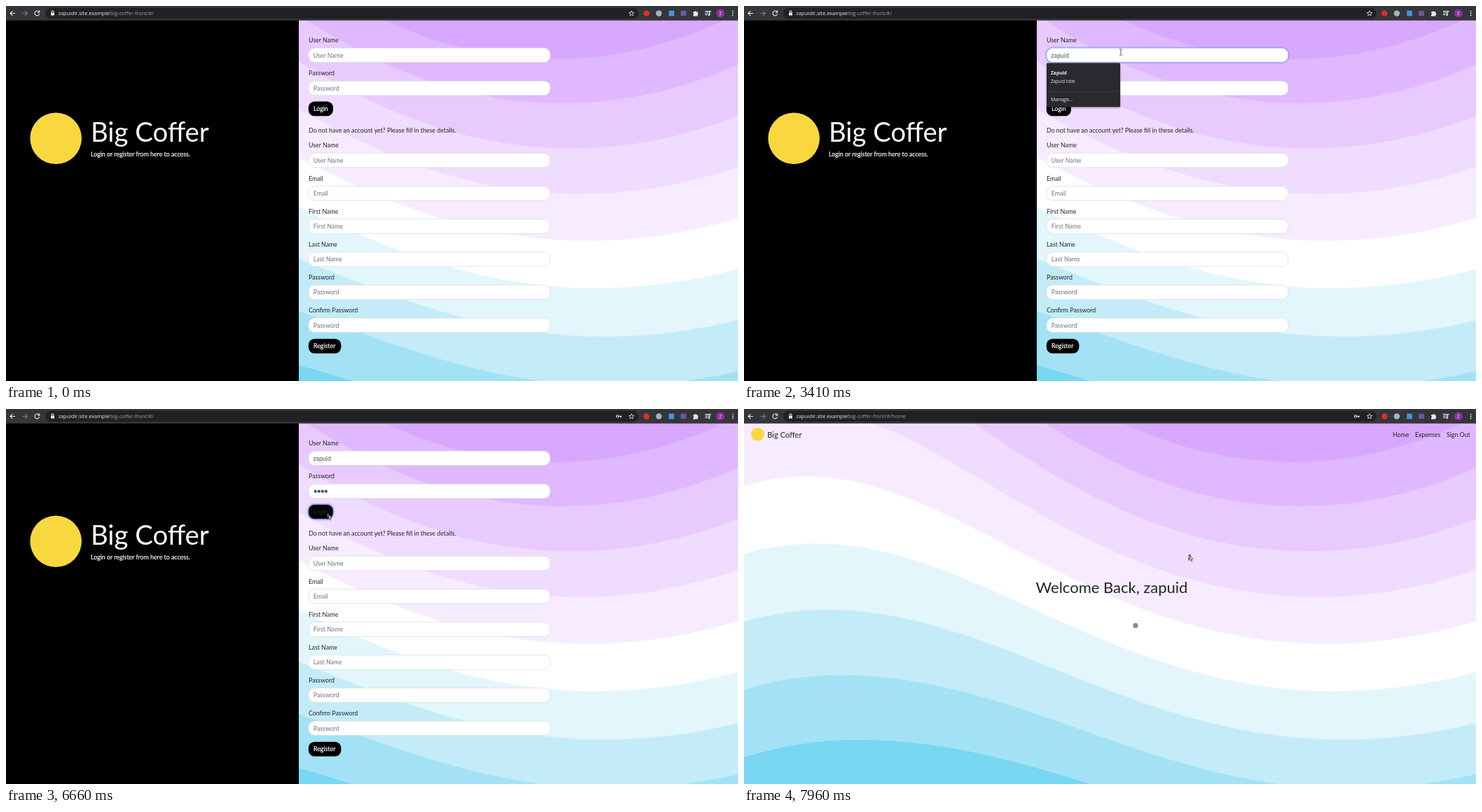
Animation, 1045 px wide and 536 px high, one loop 8000 ms. Source, as an HTML page:

```html
<!DOCTYPE html>
<html lang="en">
<head>
<meta charset="utf-8">
<title>Sign in</title>
<style>
  html, body { margin: 0; width: 100%; height: 100%; overflow: hidden; background: #000; }
  svg { display: block; width: 1045px; height: 536px; }
  text { font: 8.8px Lato, sans-serif; fill: #212529; white-space: pre; }
  .chrome text, .menu text { font-family: "Open Sans", sans-serif; fill: #e8eaed; }
  .icon { fill: none; stroke: #e8eaed; stroke-width: 1.1; }
  .field { fill: #fff; stroke: #ced4da; stroke-width: .6; }
  .hint { fill: #6c757d; }
  .value { fill: #495057; }
  .light { fill: #fff; stroke: #fff; stroke-width: .2px; }
  .ring { fill: none; stroke: #7c9cff; stroke-opacity: .55; stroke-width: 2.4; }
  .caret { stroke: #333; stroke-width: .7; }
</style>
</head>
<body>
<svg viewBox="0 0 1045 536">
  <g id="waves"><rect width="1045" height="536" fill="#d8a8ff"/></g>

  <g id="login">
    <rect y="20" width="418" height="516"/>
    <circle cx="71.2" cy="189.2" r="36.8" fill="#f9d83f"/>
    <text x="121" y="194" style="font-size:38.3px;fill:#fff">Big Coffer</text>
    <text class="light" x="121" y="215">Login or register from here to access.</text>
    <g id="form"></g>
    <text x="432" y="180.5">Do not have an account yet? Please fill in these details.</text>
    <rect x="431.8" y="136.6" width="35.2" height="20.6" rx="8.6"/>
    <text class="light" id="loginText" x="439" y="150.2">Login</text>
    <rect x="431.8" y="475.8" width="46.6" height="20.6" rx="8.6"/>
    <text class="light" x="439" y="489.3">Register</text>
    <text class="value" id="user" x="438.6" y="73.5"></text>
    <g id="dots" class="value"></g>
    <rect class="ring" id="userRing" x="431.2" y="59.4" width="346.4" height="21.6" rx="9.4"/>
    <rect class="ring" id="passRing" x="431.2" y="106.6" width="346.4" height="21.6" rx="9.4"/>
    <rect class="ring" id="loginRing" x="431" y="135.8" width="36.8" height="22.2" rx="9.4"/>
    <path class="caret" id="caret" d="M0-5V5"/>
    <g class="menu" id="menu">
      <rect id="menuBox" x="432" y="81.5" width="105" height="62.7" rx="1.5" fill="#292a2d"
        style="filter:drop-shadow(0 1px 1.5px #0006)"/>
      <g id="entries"></g>
      <g id="menuFoot">
        <path d="M432 122.3H537" stroke="#45474b" stroke-width=".6"/>
        <text x="438" y="136" style="font-size:6.9px">Manage...</text>
      </g>
    </g>
  </g>

  <g id="home">
    <circle cx="19.5" cy="36.3" r="9.5" fill="#f9d83f"/>
    <text x="33.2" y="40.6" style="font-size:11.2px">Big Coffer</text>
    <text x="926" y="39.6">Home</text>
    <text x="958" y="39.6">Expenses</text>
    <text x="1003" y="39.6">Sign Out</text>
    <text x="416.5" y="262.6" style="font-size:22px">Welcome Back, zapuid</text>
    <circle id="ball" cy="309.4" r="3.6"/>
  </g>

  <g class="chrome">
    <rect width="1045" height="20.7" fill="#35363a"/>
    <rect x="56" y="2.8" width="847" height="15.4" rx="7.7" fill="#202124"/>
    <path class="icon" d="M13 10.5H6.2M9.4 7.2L6 10.5L9.4 13.8"/>
    <path class="icon" d="M23.4 10.5H30.4M27.2 7.2L30.6 10.5L27.2 13.8" style="stroke:#7b7d81"/>
    <path class="icon" d="M47 8.2A3.4 3.4 0 1 0 47.7 11.4M47.7 6.6V9.2H45"/>
    <rect x="64" y="9.4" width="5" height="4" rx=".5" fill="#e8eaed"/>
    <path class="icon" d="M65.1 9.6V8.2A1.4 1.4 0 0 1 67.9 8.2V9.6" stroke-width=".8"/>
    <text x="74.5" y="13" style="font-size:7.35px">zapuidir.site.example</text>
    <text id="path" x="146.2" y="13" style="font-size:7.35px;fill:#9aa0a6"></text>
    <g id="key">
      <circle class="icon" cx="873" cy="10.4" r="1.6"/>
      <path class="icon" d="M874.6 10.4H879M877.6 10.4V12.4"/>
    </g>
    <path class="icon" style="stroke-width:.8" d="M893 6.8L894 9.3L896.7 9.5L894.6 11.2L895.3 13.8L893 12.4L890.7 13.8L891.4 11.2L889.3 9.5L892 9.3Z"/>
    <circle cx="914.4" cy="10.5" r="4.2" fill="#d93025"/>
    <circle cx="932" cy="10.5" r="4.2" fill="#a9b0bd"/>
    <rect x="946.3" y="6.6" width="7.6" height="7.8" fill="#4a90e2"/>
    <rect x="963.3" y="6.8" width="7.6" height="7.2" fill="#6a5a9c"/>
    <path fill="#e8eaed" d="M981 8.2H983A1.4 1.4 0 0 1 985.6 8.2H987.4V10A1.4 1.4 0 0 1 987.4 12.6V14.4H981V12.4A1.3 1.3 0 0 0 981 9.9Z"/>
    <path class="icon" d="M998 7.6H1004M998 10H1004M998 12.4H1001.4M1004.6 12.6V7.6H1006.6"/>
    <circle cx="1003.6" cy="12.7" r="1.3" fill="#e8eaed"/>
    <circle cx="1019.8" cy="10.4" r="6" fill="#8e2fa0"/>
    <text x="1019.8" y="12.9" text-anchor="middle" style="font-size:6.6px">Z</text>
    <g fill="#e8eaed"><circle cx="1037.6" cy="7.6" r=".9"/><circle cx="1037.6" cy="10.5" r=".9"/><circle cx="1037.6" cy="13.4" r=".9"/></g>
  </g>

  <g id="mouse">
    <circle id="click" r="6.6" fill="#f7ea3c" fill-opacity=".85"/>
    <path id="beam" fill="none" stroke="#333" stroke-width=".8" d="M-2-4.2H-.6L0-3.6L.6-4.2H2M0-3.6V3.6M-2 4.2H-.6L0 3.6L.6 4.2H2"/>
    <path id="arrow" fill="#fff" stroke="#222" stroke-width=".7" d="M0 0V8.6L2-.1V6.8L3.5 10L4.8 9.4L3.4 6.3H6Z"/>
  </g>
</svg>
<script>
const LOOP = 8000, HOME = 6700;
const $ = id => document.getElementById(id);
const add = (id, markup) => $(id).insertAdjacentHTML('beforeend', markup);
const show = (id, on) => { $(id).style.display = on ? '' : 'none'; };
const clamp = v => Math.max(0, Math.min(1, v));
const smooth = u => u * u * (3 - 2 * u);
const fade = (t, from, to) => clamp((t - from) / 120) * (1 - clamp((t - to) / 120));

// Each band fills everything below its crest-to-trough curve.
const bands = ['#e0b8ff', '#e8caff', '#f0dcff', '#f7ecff', '#fff', '#e2f6fc', '#c3ecf8', '#a3e2f5', '#79d7f1'];
bands.forEach((fill, k) => {
  const j = k - 4;
  const px = 90 + 11 * j + 1.6 * j * j, py = 96.3 + 96.5 * j - .6 * j * j;
  const mx = 785 + 11.5 * k, my = 76 + 62.5 * k + .6 * k * k;
  const c1 = px + (mx - px) * (.21 + .02 * k), c2 = mx - (mx - px) * (.53 - .02 * k);
  add('waves', `<path fill="${fill}" d="M0 ${110 + 97 * j}Q${px / 2} ${py} ${px} ${py}
    C${c1} ${py} ${c2} ${my} ${mx} ${my}Q${(mx + 1045) / 2} ${my} 1045 ${11 + 73 * k}V720H0Z"/>`);
});

const fields = [
  [60, 'User Name'], [107.2, 'Password'], [210.2, 'User Name'], [257.4, 'Email'],
  [304.6, 'First Name'], [351.7, 'Last Name'], [398.8, 'Password'], [446, 'Confirm Password', 'Password']
];
fields.forEach(([y, label, hint = label], i) => add('form', `
  <text x="432" y="${y - 7.9}">${label}</text>
  <rect class="field" x="431.9" y="${y}" width="345" height="20.6" rx="8.8"/>
  <text class="hint" id="hint${i}" x="438.8" y="${y + 13.5}">${hint}</text>`));

for (let i = 0; i < 4; i++) add('dots', `<circle cx="${441.7 + 5.05 * i}" cy="117.7" r="2.1"/>`);

[['Zapuid', 'Zapuid Irdel'], ['Morvel', 'Morvel Tandu'], ['Quenda', 'Quenda Osril']].forEach(([name, full], i) =>
  add('entries', `<g><text x="438" y="${98.3 + 27.5 * i}" style="font-size:6.7px;font-weight:700">${name}</text>
    <text x="438" y="${109.6 + 27.5 * i}" style="font-size:6.2px">${full}</text></g>`));

const name = 'zapuid';
const userKeys = [1730, 1830, 2490, 2580, 2670, 2900];
const passKeys = [4920, 4970, 5030, 5260];
const clicks = [[1370, 1480], [4210, 4320], [6250, 6370]];
const track = [
  [250, 989, 538], [910, 538, 61], [1090, 538, 61], [1190, 538, 66], [3640, 538, 66],
  [4060, 580, 113], [5260, 580, 113], [5440, 606, 122], [5720, 606, 122], [6230, 459, 149],
  [6740, 459, 149], [7450, 625, 208], [7600, 630, 208], [7780, 630, 208], [7960, 635, 208]
];

function pointer(t) {
  const i = track.findIndex(p => p[0] > t);
  if (i < 0) return track[track.length - 1].slice(1);
  const [t0, x0, y0] = track[Math.max(0, i - 1)], [t1, x1, y1] = track[i];
  const u = clamp((t - t0) / (t1 - t0 || 1));
  const e = i === 1 ? 1 - (1 - u) ** 2 : smooth(u);
  return [x0 + (x1 - x0) * e, y0 + (y1 - y0) * e];
}

function drawMouse(t) {
  const [x, y] = pointer(t);
  const overField = t < HOME && x > 432 && x < 777 && fields.some(([top]) => y >= top && y <= top + 20.6);
  show('mouse', t >= 250);
  $('mouse').setAttribute('transform', `translate(${x} ${y})`);
  show('beam', overField);
  show('arrow', !overField);
  show('click', clicks.some(([a, b]) => t >= a && t < b));
}

function drawLogin(t) {
  const typed = userKeys.filter(k => k <= t).length;
  const dots = passKeys.filter(k => k <= t).length;
  $('user').textContent = name.slice(0, typed);
  show('hint0', !typed);
  show('hint1', !dots);
  [...$('dots').children].forEach((d, i) => { d.style.display = i < dots ? '' : 'none'; });

  $('userRing').style.opacity = fade(t, 1435, 4220);
  $('passRing').style.opacity = fade(t, 4220, 6250);
  $('loginRing').style.opacity = clamp((t - 6250) / 120);
  const hover = clamp((t - 6130) / 150);
  const tone = `rgb(${[33, 37, 41].map(c => 255 + (c - 255) * hover)})`;
  $('loginText').style.fill = $('loginText').style.stroke = tone;

  const inPass = t >= 4240;
  const last = Math.max(inPass ? 4240 : 1370, ...[...userKeys, ...passKeys].filter(k => k <= t));
  show('caret', t >= 1370 && t < 6250 && (t - last) % 1020 < 510);
  const cx = inPass ? 439.3 + 5.05 * dots : 439 + (typed ? $('user').getComputedTextLength() : 0);
  $('caret').setAttribute('transform', `translate(${cx} ${inPass ? 117.4 : 70.2})`);

  const extra = t < 1730 ? 55 : 0;
  show('menu', t >= 1480 && t < 4230);
  $('menuBox').setAttribute('height', 62.7 + extra);
  $('menuFoot').setAttribute('transform', `translate(0 ${extra})`);
  [...$('entries').children].forEach((e, i) => { e.style.display = i && !extra ? 'none' : ''; });
}

function drawBall(t) {
  const phase = ((t - HOME) / 960) % 2;
  const u = phase > 1 ? 2 - phase : phase;
  const e = u < .5 ? 4 * u ** 3 : 1 - (2 - 2 * u) ** 3 / 2;
  const mix = clamp((t - HOME) / 240);
  $('ball').setAttribute('cx', 480 + 90 * e);
  $('ball').setAttribute('fill', `rgb(${[240, 228, 234].map(c => c + (140 - c) * mix)})`);
}

function draw(now) {
  const t = now % LOOP, home = t >= HOME;
  show('login', !home);
  show('home', home);
  show('key', t >= 4920);
  $('path').textContent = '/big-coffer-front/#/' + (home ? 'home' : '');
  if (home) drawBall(t); else drawLogin(t);
  drawMouse(t);
}

const start = performance.now();
(function tick() {
  draw(performance.now() - start);
  requestAnimationFrame(tick);
})();
</script>
</body>
</html>
```
